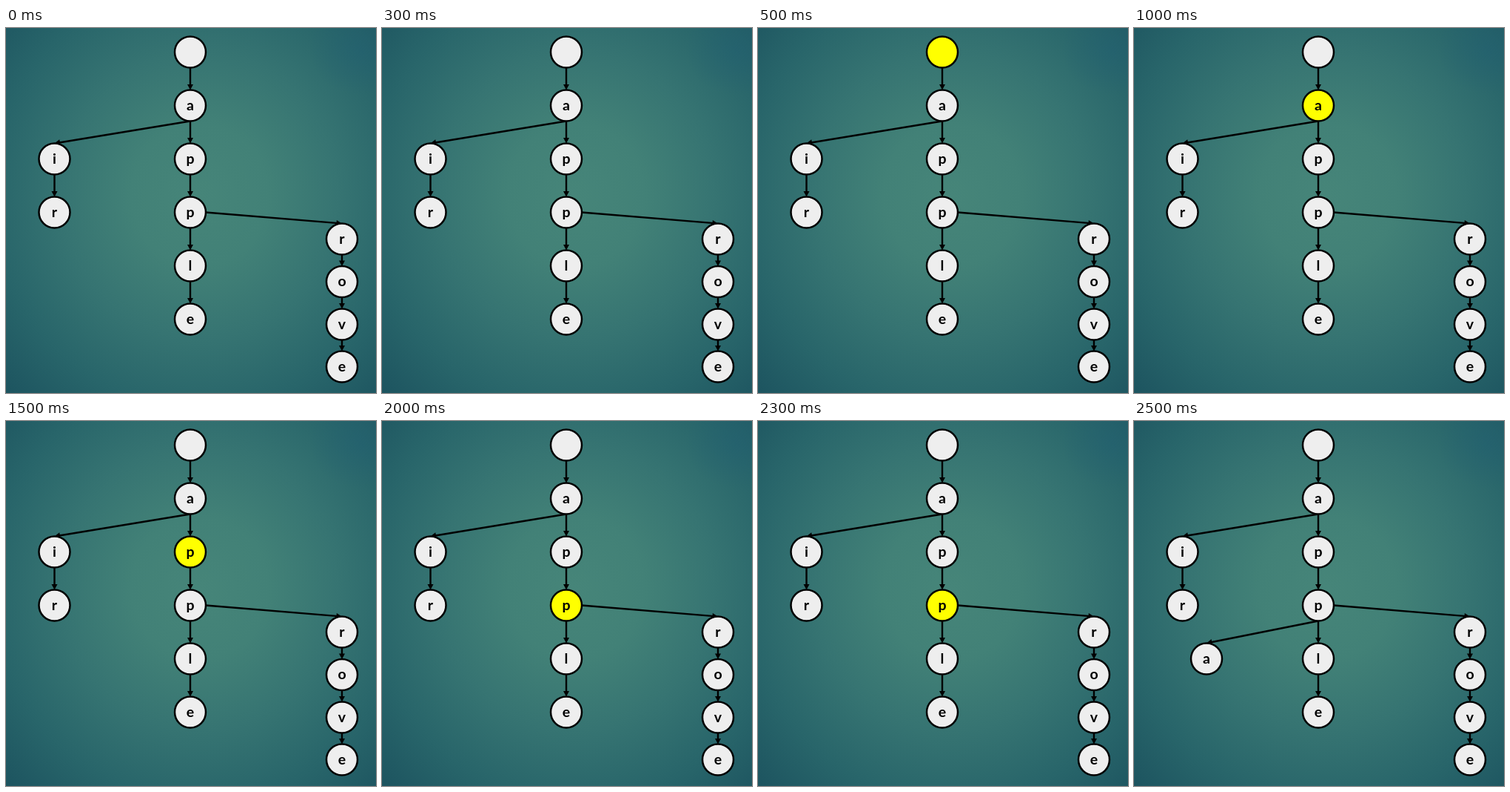
Recreate the animation shown at these times as an HTML page with a canvas. Size 500x492 px, loop 3000 ms.

```html
<!DOCTYPE html>
<html>
<head>
<meta charset="utf-8">
<style>
  html, body { margin: 0; width: 100%; height: 100%; overflow: hidden; }
  canvas { display: block; }
</style>
</head>
<body>
<canvas id="stage" width="500" height="492"></canvas>
<script>
const ctx = document.getElementById('stage').getContext('2d');
const STEP = 500, STEPS = 6, RADIUS = 21;

// The first four nodes are the ones visited, in order.
const nodes = [
  { x: 249, y: 32.5, letter: '' },
  { x: 249, y: 104.5, letter: 'a', parent: 0 },
  { x: 249, y: 176.5, letter: 'p', parent: 1 },
  { x: 249, y: 248.5, letter: 'p', parent: 2 },
  { x: 249, y: 320.5, letter: 'l', parent: 3 },
  { x: 249, y: 392.5, letter: 'e', parent: 4 },
  { x: 65.5, y: 176.5, letter: 'i', parent: 1 },
  { x: 65.5, y: 248.5, letter: 'r', parent: 6 },
  { x: 454, y: 284.5, letter: 'r', parent: 3, fromSide: true },
  { x: 454, y: 342, letter: 'o', parent: 8 },
  { x: 454, y: 399.5, letter: 'v', parent: 9 },
  { x: 454, y: 456.5, letter: 'e', parent: 10 }
];
const inserted = { x: 98, y: 320.5, letter: 'a', parent: 3 };

function glow(x, y, rx, ry, stops) {
  ctx.save();
  ctx.translate(x, y);
  ctx.scale(rx, ry);
  const gradient = ctx.createRadialGradient(0, 0, 0, 0, 0, 1);
  stops.forEach(([at, color]) => gradient.addColorStop(at, color));
  ctx.fillStyle = gradient;
  ctx.fillRect(-x / rx, -y / ry, 500 / rx, 492 / ry);
  ctx.restore();
}

function drawBackground() {
  glow(262, 225, 375, 385, [
    [0, '#468579'], [0.25, '#428177'], [0.5, '#367472'],
    [0.75, '#28656a'], [1, '#1c535f']
  ]);
  glow(480, 30, 70, 60, [[0, 'rgba(34,96,114,.5)'], [1, 'rgba(34,96,114,0)']]);
}

function drawArrow(x1, y1, x2, y2) {
  const length = Math.hypot(x2 - x1, y2 - y1);
  ctx.save();
  ctx.translate(x1, y1);
  ctx.rotate(Math.atan2(y2 - y1, x2 - x1));
  ctx.fillStyle = '#000';
  ctx.fillRect(0, -1.2, length - 5, 2.4);
  ctx.beginPath();
  ctx.moveTo(length, 0);
  ctx.lineTo(length - 7.5, -4);
  ctx.lineTo(length - 7.5, 4);
  ctx.fill();
  ctx.restore();
}

function drawEdge({ x, y, parent, fromSide }) {
  if (parent === undefined) return;
  const from = nodes[parent];
  drawArrow(from.x + (fromSide ? RADIUS : 0), from.y + (fromSide ? 0 : RADIUS),
    x, y - RADIUS);
}

function drawNode({ x, y, letter }, active) {
  ctx.beginPath();
  ctx.arc(x, y, RADIUS, 0, 2 * Math.PI);
  ctx.fillStyle = active ? '#ff0' : '#eee';
  ctx.fill();
  ctx.lineWidth = 2.5;
  ctx.strokeStyle = '#000';
  ctx.stroke();
  ctx.fillStyle = '#000';
  ctx.fillText(letter, x, y + 6);
}

function draw() {
  const step = Math.floor(performance.now() / STEP) % STEPS;
  const tree = step === STEPS - 1 ? [...nodes, inserted] : nodes;
  drawBackground();
  ctx.font = 'bold 19.5px Lato, sans-serif';
  ctx.textAlign = 'center';
  tree.forEach(drawEdge);
  tree.forEach((node, i) => drawNode(node, i === step - 1 && step < STEPS - 1));
  requestAnimationFrame(draw);
}
draw();
</script>
</body>
</html>
```
